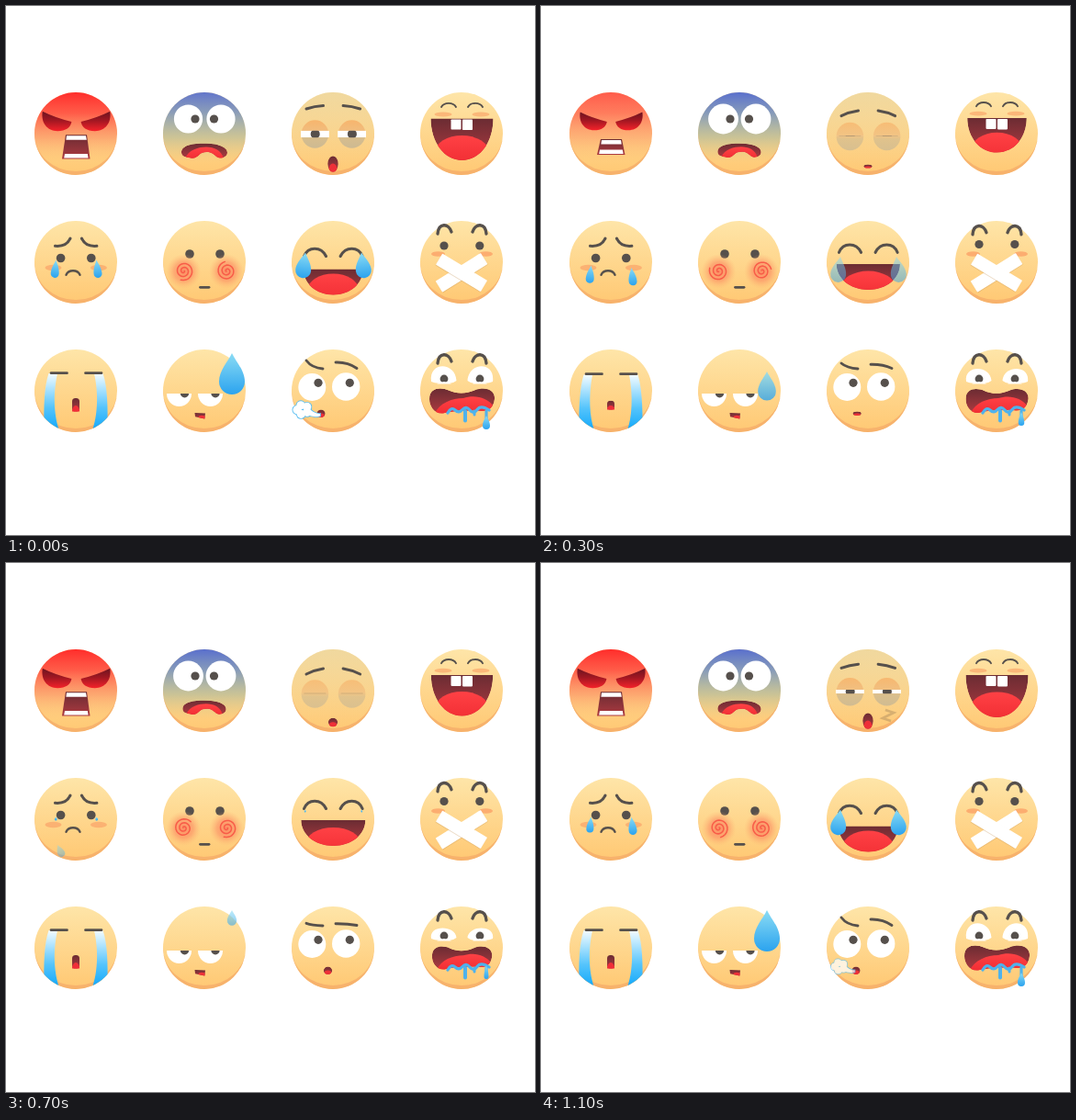
Animation, 576 px wide and 576 px high, one loop 1200 ms. Source, as an HTML page:

```html
<!DOCTYPE html>
<html lang="en">
<head>
<meta charset="utf-8">
<title>Faces</title>
<style>
html, body { margin: 0; width: 100%; height: 100%; overflow: hidden; background: #fff; }
svg { display: block; width: 100vw; height: 100vh; }
.ink { fill: none; stroke: #56504c; stroke-linecap: round; }
.drool { fill: none; stroke: #4fb2ec; stroke-linecap: round; stroke-linejoin: round; }
</style>
</head>
<body>
<svg viewBox="0 0 576 576">
  <defs id="defs"></defs>
  <g id="stage"></g>
</svg>
<script>
const INK = '#56504c', BLUSH = '#f9a66b', R = 45, STEPS = 12, STEP_MS = 100;

const gradient = (id, ...stops) => `<linearGradient id="${id}" x2="0" y2="1">` +
  stops.map(([offset, color, alpha = 1]) =>
    `<stop offset="${offset}" stop-color="${color}" stop-opacity="${alpha}"/>`).join('') +
  '</linearGradient>';

document.getElementById('defs').innerHTML =
  gradient('skin', [0, '#fee5a8'], [1, '#ffc873']) +
  gradient('rage', [0, '#ff2d2b'], [.25, '#ff3f36', .82], [.55, '#fa6a4c', .42], [.85, '#fdb36c', 0]) +
  gradient('fear', [0, '#5169cf'], [.25, '#6487c2', .82], [.55, '#86ab a4'.replace(' ', ''), .45], [.85, '#c8c890', 0]) +
  gradient('tired', [0, '#e2cb95', .5], [1, '#f0cf8c', 0]) +
  gradient('glare', [0, '#6b1420'], [.45, '#a01722'], [1, '#f5222a']) +
  gradient('mouth', [0, '#6b2c33'], [1, '#ad3a40']) +
  gradient('tongue', [0, '#ff4145'], [1, '#ee2a30']) +
  gradient('bag', [0, '#f7b56d'], [.45, '#f0be80'], [.6, '#d8bd8c'], [1, '#cdba93']) +
  gradient('tear', [0, '#8bdcf4'], [1, '#2ba3ef']) +
  gradient('stream', [0, '#f4fbff'], [.15, '#cdeeff'], [.6, '#55c4fc'], [1, '#12a8fa']) +
  `<radialGradient id="glow"><stop stop-color="#fb7656" stop-opacity=".75"/>
   <stop offset=".55" stop-color="#fb8a62" stop-opacity=".55"/>
   <stop offset="1" stop-color="#fdb070" stop-opacity="0"/></radialGradient>`;

// Motion rules, in steps of the loop.
let step = 0;
function ramp(from, to) {
  const u = Math.min(1, Math.max(0, (step - from) / (to - from)));
  return u * u * (3 - 2 * u);
}
const hold = (rise, full, ease, end) => ramp(rise, full) - ramp(ease, end);
const wave = period => .5 - .5 * Math.cos(2 * Math.PI * step / period);

const path = (d, fill, extra = '') => `<path d="${d}" fill="${fill}" ${extra}/>`;
const line = (d, width = 3, kind = 'ink') => `<path class="${kind}" d="${d}" stroke-width="${width}"/>`;
const oval = (x, y, rx, ry, fill, extra = '') =>
  `<ellipse cx="${x}" cy="${y}" rx="${rx}" ry="${ry}" fill="${fill}" ${extra}/>`;
const dot = (x, y, r, fill = INK) => oval(x, y, r, r, fill);
const box = (x, y, w, h, fill, r = 0, extra = '') =>
  `<rect x="${x}" y="${y}" width="${w}" height="${h}" rx="${r}" fill="${fill}" ${extra}/>`;
const group = (transform, content) => `<g transform="${transform}">${content}</g>`;
const mirror = (x, content) => content + group(`translate(${2 * x} 0) scale(-1 1)`, content);
const clip = (id, shape, content) =>
  `<clipPath id="${id}">${shape}</clipPath><g clip-path="url(#${id})">${content}</g>`;
const arch = (x, y) => `M${x - 7} ${y + 9}C${x - 6} ${y - 3} ${x + 5} ${y - 3} ${x + 8} ${y + 7}`;

const head = (x, y, tint, alpha = 1) =>
  dot(x, y, R, 'url(#skin)') +
  (tint ? oval(x, y, R, R, `url(#${tint})`, `opacity="${alpha}"`) : '') +
  path(`M${x - R} ${y}A${R} ${R} 0 0 0 ${x + R} ${y}A${R} 41 0 0 1 ${x - R} ${y}`, '#f4a868', 'opacity=".7"');

function drop(x, top, w, h, alpha = 1, tilt = 0) {
  const r = w / 2, neck = top + h * .42, belly = top + h - r;
  return path(`M${x} ${top}C${x + w * .15} ${top + h * .2} ${x + r} ${neck} ${x + r} ${belly}` +
    `A${r} ${r} 0 0 1 ${x - r} ${belly}C${x - r} ${neck} ${x - w * .15} ${top + h * .2} ${x} ${top}Z`,
    'url(#tear)', `opacity="${alpha}" transform="rotate(${tilt} ${x} ${top})"`);
}

function grin(id, x, top, bottom, half, tongueTop) {
  const bend = top + (bottom - top) * .57;
  const d = `M${x - half} ${top}H${x + half}C${x + half} ${bend} ${x + half * .57} ${bottom} ${x} ${bottom}` +
    `S${x - half} ${bend} ${x - half} ${top}Z`;
  return clip(id, path(d), path(d, 'url(#mouth)') + oval(x, tongueTop + 18, half * .86, 18, 'url(#tongue)'));
}

function smallMouth(id, x, y, rx, ry) {
  const shape = oval(x, y, rx, ry, 'url(#mouth)');
  return clip(id, shape, shape + oval(x, y + ry * .7, rx * .8, ry * .75, '#ee3038'));
}

function angry() {
  const calm = hold(0, 2, 4, 6);
  const top = 140.3 + 4.7 * calm, bottom = 166.5 - 4.5 * calm;
  const eye = path('M-5 1Q-22-3-36-10C-38 2-31 11-20 11C-11 11-6 7-5 1Z', 'url(#glare)');
  return head(76, 139, 'rage', 1 - .25 * calm) +
    group(`translate(76.5 125) scale(${1.02 - .08 * calm})`, mirror(0, eye)) +
    path(`M65 ${top}H88L91.5 ${bottom}H61Z`, 'url(#mouth)') +
    path(`M66 ${top + 1}H87L87.8 ${top + 5.5}H65.4Z`, '#fff') +
    path(`M64 ${bottom - 5.5}H88.8L89.6 ${bottom - 1}H63.2Z`, '#fff');
}

function scared() {
  const shake = wave(4), r = 15.6 + 1.6 * shake;
  const d = 'M-25 10C-25 2-12 0 0 0C14 0 25 4 25 10C25 14 21 16 17 16C13 16 12 12 6 10C2 9-3 10-5 12C-8 15-11 17-15 16C-21 15-25 14-25 10Z';
  return head(216, 139, 'fear', .9 + .1 * shake) +
    dot(198.5, 123, r, '#fff') + dot(234, 123, r, '#fff') + dot(206, 123, 4.6) + dot(226.5, 123, 4.6) +
    group(`translate(216 149.5) scale(${1 - .1 * shake})`, clip('fearMouth', path(d),
      path(d, 'url(#mouth)') + path('M-21 17C-18 7-6 4 2 4C11 4 19 8 21 17V20H-21Z', 'url(#tongue)')));
}

function sleepy() {
  const doze = hold(0, 4, 9, 12), yawn = 1 - hold(0, 4, 5, 9), z = step - 9;
  const gap = 7.5 * (1 - doze) ** 2, mid = 139.4 + 2.6 * doze;
  const eye = (id, x) => {
    const slit = box(x - 15.5, mid - gap / 2, 31, gap, '#fff');
    return oval(x, 139.5 + 3 * doze, 14.8, 15.2, 'url(#bag)', `opacity="${1 - .28 * doze}"`) +
      box(x - 12, mid - .4, 24, .8, '#c9a877', 0, `opacity="${doze}"`) +
      clip(id, slit, slit + dot(x + .3, mid, 5));
  };
  const zed = z < 0 ? '' : group(`translate(${369 + z * 4.5} ${171 - z * 2.5}) rotate(${z * 9}) scale(${1 + z * .3})`,
    `<path d="M-3-3H3L-3 3H3" fill="none" stroke="#82684c" stroke-width="1.7" opacity="${.9 - z * .3}"/>`);
  return head(356, 139, 'tired') +
    mirror(356.3, line(`M327 ${112 + 9 * doze}Q336 ${109 + 7.5 * doze} 345.5 ${108.5 + 6.5 * doze}`)) +
    eye('lidL', 336.4) + eye('lidR', 376.6) +
    smallMouth('yawn', 356, 175 - 3 * yawn, 4.5 + 1.3 * yawn, .8 + 8 * yawn) + zed;
}

function toothy() {
  const bob = wave(4), close = hold(0, 4, 4, 8), y = -1.7 * bob;
  const top = 122.5 + y * .7;
  return head(496, 139) +
    mirror(496.5, line(`M474 ${110 + y}C477 ${104.5 + y} 487 ${104.5 + y} 490 ${110 + y}`, 1.9) +
      oval(476, 118 + y, 9.5, 2.4, BLUSH, 'opacity=".7"')) +
    grin('laugh', 496.5, top, 168 - 10 * close, 34 - 2 * close, top + 18.5 - 3 * close) +
    box(484.5, top + 1, 11, 11, '#fff', .8) + box(497, top + 1, 11, 11.5, '#fff', .8);
}

function sad() {
  const slide = hold(0, 4, 4, 6), splash = hold(6, 7, 7, 8);
  const tear = (x, size, travel, tilt) =>
    drop(x, 276.5 + travel * slide, 3 + 6 * size, 4 + 15.5 * size, 1, tilt);
  return head(76, 279) +
    mirror(76.2, line('M53.5 261.3C61 262 67 259.5 70 253') + oval(51.5, 285, 9, 3.2, BLUSH, 'opacity=".75"') +
      dot(59.6, 274.5, 4.8)) +
    line('M65.5 292.8C68 286.8 78 286.8 80.5 292.8', 2.4) +
    tear(54.5, 1 - hold(6, 7, 8, 12), 7, 5) + tear(98.5, 1 - hold(6, 7, 7, 10.5), 10, -6) +
    drop(56, 307, 8, 14, .4 * splash, -25);
}

function spiral(x, y, turn) {
  let d = '';
  for (let i = 0; i <= 50; i++) {
    const a = i / 50 * Math.PI * 4.6, r = .8 + i * .19;
    d += `${i ? 'L' : 'M'}${(x + r * Math.cos(a)).toFixed(1)} ${(y + r * Math.sin(a)).toFixed(1)}`;
  }
  return path(d, 'none', `stroke="#f85c48" stroke-width="1.5" stroke-linecap="round" transform="rotate(${turn} ${x} ${y})"`);
}

function dizzy() {
  const open = 4.8 * (1 - .9 * hold(3, 4, 4, 5)), turn = step * 360 / STEPS;
  return head(216, 279) +
    oval(200, 270, 4.8, open, INK) + oval(233, 270, 4.8, open, INK) +
    dot(193.5, 289, 19, 'url(#glow)') + dot(240, 289, 19, 'url(#glow)') +
    spiral(193.5, 288.5, turn) + spiral(240.5, 288.5, 150 + turn) +
    line('M211.5 306.3H221', 2.8);
}

function joyful() {
  const lift = hold(0, 4, 8, 11), size = 1 - hold(5, 6, 6, 11);
  const y = 272.5 - 5 * lift, top = 286.5 - 6.5 * lift;
  return head(356, 279) +
    mirror(356.3, line(`M324.5 ${y}C329 ${y - 11} 343 ${y - 11} 348.5 ${y}`, 3.1)) +
    grin('joy', 356.3, top, top + 28, 32.5 + 2.5 * lift, top + 5 + 3 * lift) +
    mirror(356.5, drop(326, 268.5 + 7 * hold(0, 5, 5, 6), 17 * size, 28 * size, 1 - hold(0, 6, 6, 7), 7));
}

function taped() {
  const bob = wave(4), eyeY = 261 - 3 * bob;
  const strip = (angle, length) => group(`translate(496 290.3) rotate(${angle})`,
    box(-length / 2, -6.4, length, 14.4, '#c99a62', 1, 'opacity=".35"') + box(-length / 2, -7.1, length, 14.2, '#fff', .8));
  return head(496, 279) +
    mirror(496.5, line(arch(477, 239 + 1.5 * bob), 3.3) + oval(470.5, 270, 7.5, 2.8, '#fba168', 'opacity=".8"')) +
    dot(477, eyeY, 4.6) + oval(515.8, eyeY, 4.6, 4.6 * (1 - .8 * hold(8, 9, 9, 10)), INK) +
    strip(-32, 58) + strip(31, 57);
}

function sobbing() {
  const sob = hold(0, 2, 4, 6) + hold(7, 9, 9, 11);
  const top = 427 + 2.7 * sob, height = 14.5 - 4.7 * sob, y = 400 + 1.5 * sob;
  const stream = path(`M46.5 ${y}C${41.5 + sob} 415 41 435 41.5 462H58C53 448 ${50.5 + sob} 425 56 ${y}Z`, 'url(#stream)');
  return head(76, 419) +
    clip('cheeks', dot(76, 419, R), mirror(76, stream)) +
    mirror(76.5, line(`M49 ${399.7 + sob}H66.5`, 2.7)) +
    clip('wail', box(72, top, 8, height, '#000', 3.6), box(72, top, 8, height, 'url(#mouth)') +
      oval(76, top + height, 4, height * .45, '#f02f38')) +
    box(72, top + height - 2, 8, 2, '#f02f38');
}

function awkward() {
  const size = .15 + .85 * (1 - hold(1, 6, 6, 9));
  const eye = (x, pupil) =>
    path(`M${x - 13.5} 422H${x + 13.5}A13.5 14 0 0 1 ${x - 13.5} 422Z`, '#fff') +
    path(`M${pupil - 4.6} 422H${pupil + 4.6}A4.6 4.4 0 0 1 ${pupil - 4.6} 422Z`, INK);
  return head(216, 419) + eye(188.5, 194.5) + eye(222.5, 228) +
    path('M205.5 443L217 443.6L216.3 449.5L206 447.2Z', 'url(#mouth)') +
    path('M210 446.6Q213 444.8 216.6 446.6L216.3 449.5L209.5 448Z', '#ee3038') +
    drop(246, 378 + 40 * hold(1, 5, 5, 6), 28 * size, 45 * size, .3 + .7 * size);
}

function smoke(x, y, size, alpha) {
  const lobes = [0, 1, 2, 3, 4].map(i => i * 1.257 + .6);
  const layer = (grow, fill) =>
    path('M6-1Q13 6 19 5.5V8Q12 10 4 6Z', fill, `stroke="${fill}" stroke-width="${grow * 2}"`) +
    lobes.map(a => dot(6 * Math.cos(a), 1 + 5 * Math.sin(a), 4.6 + grow, fill)).join('');
  return `<g transform="translate(${x} ${y}) scale(${size})" opacity="${alpha}">${layer(.9, '#58bdf0')}${layer(0, '#fff')}</g>`;
}

function puffing() {
  const raise = 1 - hold(1, 6, 6, 9), puff = 1 - hold(0, 3, 9, 12);
  const cloudX = step > STEPS / 2 ? 331 - 8 * puff : 322 + puff;
  return head(356, 419) +
    dot(333.3, 415, 15, '#fff') + dot(370.2, 414.5, 15.2, '#fff') +
    dot(340, 410.3, 4.6) + dot(374.3, 410.3, 4.6) +
    line(`M327 ${394.5 - 8.5 * raise}Q333 ${394.5 - .5 * raise} 345 395`, 2.9) +
    line(`M359 ${394.5 - 6.5 * raise}Q372 ${394.5 - 7 * raise} 382 394.5`, 2.9) +
    smallMouth('blow', 343 + 7.5 * hold(2, 6, 7, 11), 443.7, 4.7, 4.3 - 2.8 * hold(1, 4, 5, 7)) +
    smoke(cloudX, 438.5, .5 + .5 * puff, puff);
}

function drooling() {
  const squint = hold(0, 2, 2, 4) + hold(6, 7, 9, 11);
  const top = 387 + 7 * squint, fall = 461 - 8 * squint;
  const eye = path(`M463 409C460 ${top} 489 ${top} 490.5 408Q485 412.5 477 410Q469 412 463 409Z`, '#fff') +
    clip('peek', path('M460 380H495V411H460Z'), dot(477, 406, 4.4)) +
    path('M469 411.5Q477 406.5 485 411.5Z', '#fff');
  const d = 'M461 428C461 415 474 415 482 418.5C491 422.5 501 422.5 511 418C522 414 533 418 532 428C531 437 526 441 518 441C508 440 490 440 478 443C468 446 461 437 461 428Z';
  return head(496, 419) + mirror(496.5, line(arch(477, 380), 3.3) + eye) +
    group(`translate(497 430) scale(${1 - .08 * squint}) translate(-497 -430)`,
      clip('slobber', path(d), path(d, 'url(#mouth)') +
        path('M466 446C470 433 485 427 498 427C510 423 524 426 531 436V448H466Z', 'url(#tongue)'))) +
    line('M481 443Q485 436 489 440T497 439.5T505 440T513 439.5T526 440', 3.2, 'drool') +
    line('M500 441V451.5', 4, 'drool') + line('M510 441V445', 3, 'drool') +
    line(`M523 441V${fall - 8}`, 3.2, 'drool') +
    drop(523, fall - 15, 8 - 3 * squint, 15);
}

const faces = [angry, scared, sleepy, toothy, sad, dizzy, joyful, taped, sobbing, awkward, puffing, drooling];
const stage = document.getElementById('stage');
const start = performance.now();
let shown = -1;

function tick() {
  step = Math.floor((performance.now() - start) / STEP_MS) % STEPS;
  if (step !== shown) stage.innerHTML = faces.map(face => face()).join('');
  shown = step;
  requestAnimationFrame(tick);
}
tick();
</script>
</body>
</html>
```
